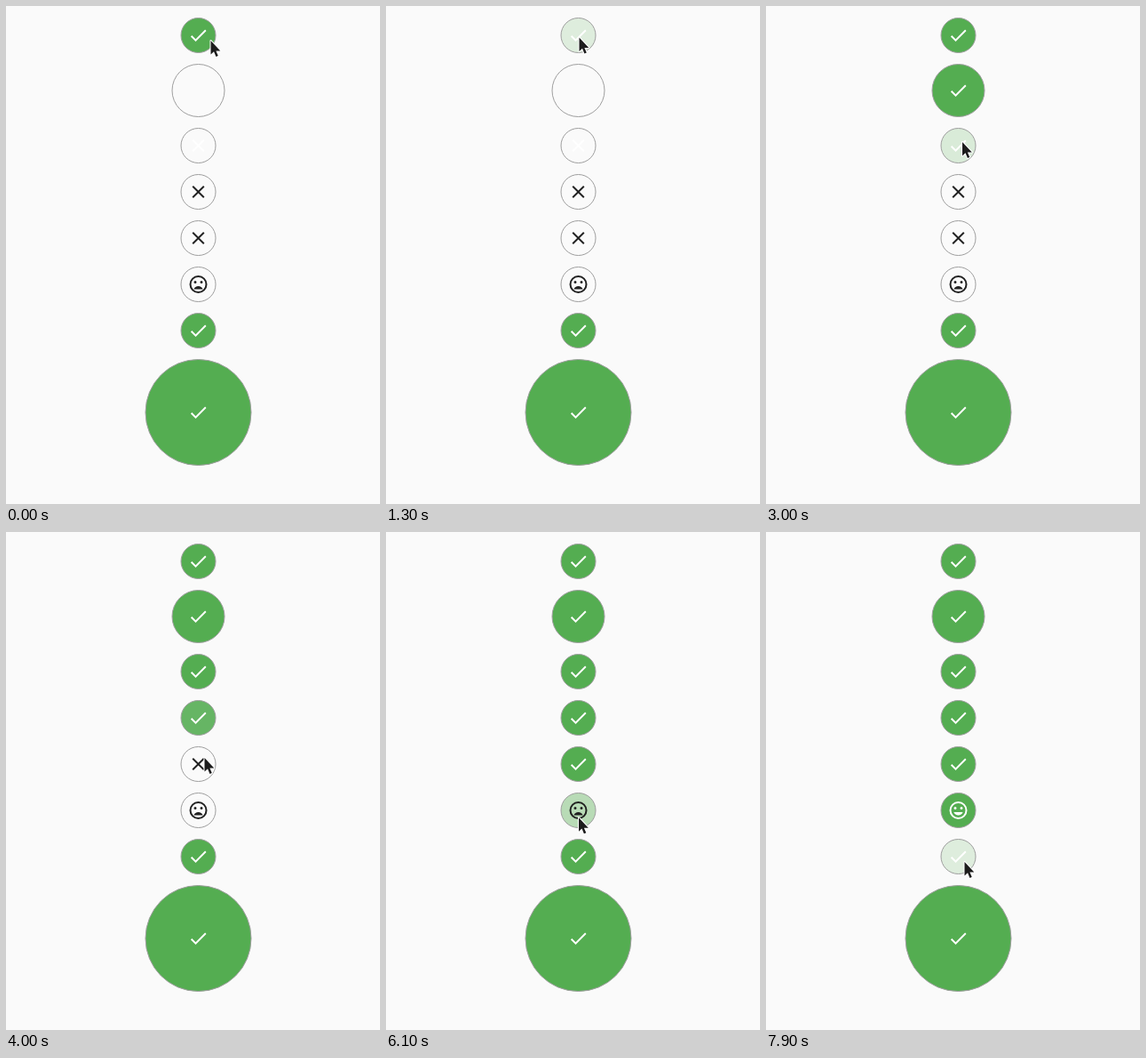
These frames come from a looping animation (421x560 px, 8000 ms). An HTML page:

```html
<!DOCTYPE html>
<html lang="en">
<head>
<meta charset="utf-8">
<title>Round check boxes</title>
<style>
  html, body { margin: 0; width: 100%; height: 100%; overflow: hidden; background: #fafafa; }
  svg { display: block; width: 421px; height: 560px; }
</style>
</head>
<body>
<svg id="stage" viewBox="0 0 421 560"></svg>
<script>
const LOOP = 8000, STEP = 100, CENTER_X = 216.5;
const OFF = [250, 250, 250], ON = [84, 173, 81], INK = '#212121';

const FACE = 'M12 2a10 10 0 1 0 0 20a10 10 0 1 0 0-20zm0 18a8 8 0 1 1 0-16a8 8 0 1 1 0 16z' +
  'M7 9.5a1.5 1.5 0 1 0 3 0a1.5 1.5 0 1 0-3 0zM14 9.5a1.5 1.5 0 1 0 3 0a1.5 1.5 0 1 0-3 0z';
const ICONS = {
  none: '',
  check: 'M9 16.17L4.83 12l-1.42 1.41L9 19 21 7l-1.41-1.41z',
  close: 'M19 6.41L17.59 5 12 10.59 6.41 5 5 6.41 10.59 12 5 17.59 6.41 19 12 13.41 17.59 19 19 17.59 13.41 12z',
  happy: FACE + 'M12 17.5c2.33 0 4.31-1.46 5.11-3.5H6.89c.8 2.04 2.78 3.5 5.11 3.5z',
  sad: FACE + 'M12 14c-2.33 0-4.31 1.46-5.11 3.5h10.22c-.8-2.04-2.78-3.5-5.11-3.5z'
};

// clicks: times at which the box is toggled
const boxes = [
  { y: 33, checked: true, clicks: [410, 1215] },
  { y: 95, r: 30, clicks: [2210] },
  { y: 157, off: 'close', offColor: '#fff', clicks: [2900] },
  { y: 209, off: 'close', clicks: [3555] },
  { y: 261, off: 'close', duration: 60, clicks: [4150] },
  { y: 313, on: 'happy', off: 'sad', clicks: [4915, 5800, 6690] },
  { y: 365, checked: true, off: 'close', clicks: [6965, 7815] },
  { y: 457, r: 60, checked: true }
].map(box => ({ r: 20, checked: false, on: 'check', off: 'none', offColor: INK, duration: 500, clicks: [], ...box }));

// time, x, y
const pointerPath = [
  [0, 230.5, 39], [300, 217.5, 35.5], [1400, 217.5, 35.5], [1900, 221, 86],
  [2400, 221, 86], [2800, 221, 153], [3100, 221, 153], [3500, 222, 205],
  [3600, 222, 205], [3800, 223.5, 249], [4000, 223.5, 254], [4200, 223.5, 254],
  [4700, 218, 313], [4900, 218, 313], [5200, 212.5, 326], [5350, 213, 350],
  [5600, 214, 327], [5800, 217, 322], [6600, 217, 320], [6700, 217, 322],
  [6900, 215, 357], [7000, 215, 359], [7200, 215, 359], [7400, 232, 371],
  [7500, 232, 371], [7800, 223.5, 371], [8000, 223.5, 371]
];

const stage = document.getElementById('stage');

function add(tag, attrs) {
  const node = document.createElementNS('http://www.w3.org/2000/svg', tag);
  for (const key in attrs) node.setAttribute(key, attrs[key]);
  return stage.appendChild(node);
}

for (const box of boxes) {
  box.disc = add('circle', { cx: CENTER_X, cy: box.y, r: box.r - 0.5, stroke: '#9e9e9e', 'stroke-width': 1 });
  box.icon = add('path', { transform: `translate(${CENTER_X - 12} ${box.y - 12})` });
}
const pointer = add('path', {
  d: 'M0 0V15.6L3.5 12.2L5.9 18L8.3 17L5.9 11.4H10.8z',
  fill: '#1c1c1c', stroke: '#fff', 'stroke-width': 2, 'stroke-linejoin': 'round', 'paint-order': 'stroke'
});

function mix(from, to, amount) {
  return from.map((value, i) => value + (to[i] - value) * amount);
}

function drawBox(box, time) {
  const past = box.clicks.filter(click => click <= time);
  const checked = box.checked !== (past.length % 2 === 1);
  const progress = past.length ? Math.min(1, (time - past[past.length - 1]) / box.duration) : 1;
  const color = checked ? mix(OFF, ON, progress) : mix(ON, OFF, progress);
  box.disc.setAttribute('fill', `rgb(${color.map(Math.round)})`);
  box.icon.setAttribute('d', ICONS[checked ? box.on : box.off]);
  box.icon.setAttribute('fill', checked ? '#fff' : box.offColor);
}

function pointerAt(time) {
  const next = pointerPath.findIndex(key => key[0] > time);
  const from = pointerPath[next - 1], to = pointerPath[next];
  return mix(from, to, (time - from[0]) / (to[0] - from[0])).slice(1);
}

function render(elapsed) {
  const time = Math.floor((elapsed % LOOP) / STEP) * STEP;
  boxes.forEach(box => drawBox(box, time));
  pointer.setAttribute('transform', `translate(${pointerAt(time)})`);
}

const start = performance.now();
function tick() {
  render(performance.now() - start);
  requestAnimationFrame(tick);
}
tick();
</script>
</body>
</html>
```
